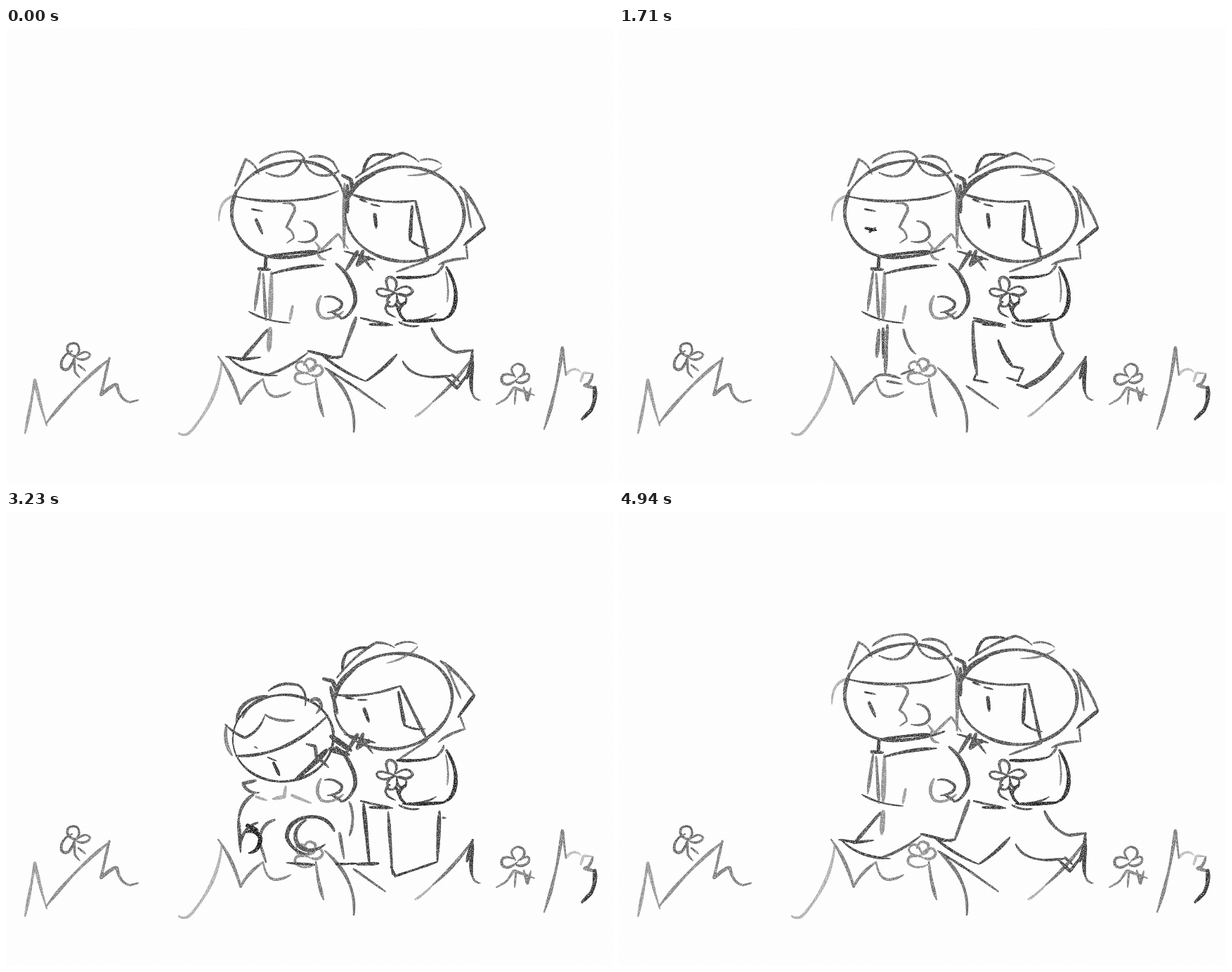
Write an HTML page with a canvas that moves like this. It is 864 px wide and 648 px high and loops after 5.13 s.

```html
<!DOCTYPE html>
<html>
<head>
<meta charset="utf-8">
<title>Pencil walk</title>
<style>
html, body { margin: 0; width: 100%; height: 100%; overflow: hidden; background: #fdfdfd }
canvas { display: block }
</style>
</head>
<body>
<canvas id="stage" width="864" height="648"></canvas>
<script>
const ctx = document.getElementById('stage').getContext('2d');
const STEP = 190, PAPER = '#fdfdfd';

// Each line: stroke width, grey level, path.
const art = {
  grassLeft: `
5 145 M27 577Q36 535 41 501Q48 535 58 566
5 130 M58 562Q100 508 148 471
5 120 M147 470L135 523Q152 507 158 508Q161 529 176 533L188 530
4 95 M98 468Q83 462 89 451Q105 444 104 461L98 470M94 460Q76 468 79 484Q91 494 98 466
4 105 M100 468Q114 456 120 466Q113 476 100 470M97 470L98 490L105 498M103 480L113 488`,
  grassMid: `
5 120 M302 468Q322 494 334 535Q344 515 366 500
5 170 M307 474Q304 525 266 571Q256 584 246 577
4 125 M366 500Q370 525 384 525Q396 524 405 518
5 110 M441 500Q444 530 452 553
5 105 M454 484Q500 525 495 575
4 95 M495 510L540 542
4 170 M583 553Q596 545 608 532
5 105 M608 532Q640 505 665 468
6 55 M664 469L656 499M664 475Q660 510 664 521
4 95 M664 520Q666 529 675 530`,
  wildflower: `
4 130 M430 492Q410 490 413 479Q424 468 431 488M424 480Q428 466 440 474Q443 488 428 490
4 135 M432 486Q448 474 451 488Q446 500 431 493M428 492Q408 488 412 502Q424 512 441 503`,
  grassRight: `
4 105 M725 497Q713 483 728 478Q746 482 732 497M722 495Q702 489 706 504Q713 513 728 500
4 105 M729 498Q748 486 744 500Q735 509 724 503
4 120 M698 536L712 528L723 512L752 523M726 512L724 536M737 512L742 531L747 513
5 120 M766 571Q784 520 792 455L797 494
4 180 M797 494Q808 480 818 490M818 503L822 491L835 492
5 115 M835 493Q832 507 824 509L838 513
7 45 M838 512Q840 532 832 545L820 557`,
  girlHead: `
5 75 M483 261A84 67 3 0 1 652 269A84 67 3 0 1 483 261
5 60 M508 205Q514 183 524 181Q540 178 551 182
4 80 M498 213Q530 188 564 178Q578 181 588 191
3 90 M590 188Q608 184 620 194
3 130 M620 198Q604 210 572 210
7 70 M486 262L486 224M479 210L491 216L493 231M488 242Q497 217 525 208
4 70 M490 236Q532 252 582 246
5 70 M583 247L601 330
6 55 M578 254L575 302
4 50 M575 302Q588 313 602 314
6 45 M525 266L527 285
3 60 M504 244L514 248M520 251L532 254
5 90 M647 226Q668 248 682 285
6 55 M681 285L652 309
4 100 M653 230L662 284M655 309L657 328
4 95 M657 328Q630 329 616 337M601 331L556 347`,
  girlBlush: `4 185 M541 285L540 291M546 285L545 291M551 285L550 291`,
  neck: `
7 75 M500 319L484 345M508 318L500 338L516 326
4 70 M506 324L522 345M500 334L522 328M482 318L525 330`,
  girlBody: `
5 40 M557 355Q594 357 612 350
4 90 M612 350Q622 342 623 334
6 35 M627 341Q642 365 640 386Q638 409 624 414
5 25 M624 415Q595 418 565 417
3 115 M626 347Q631 372 628 390
3 60 M575 417Q603 414 612 407
4 65 M505 413Q525 418 550 423M560 419Q574 427 588 424
5 50 M518 422L546 423`,
  heldFlower: `
4 80 M545 374Q536 353 549 355Q561 361 552 376M552 376Q525 366 528 377Q535 387 555 377
4 75 M555 374Q572 362 579 375Q574 385 555 378M551 378Q539 385 544 396Q557 400 557 382
4 65 M560 378Q574 381 568 393Q557 397 556 380M546 390Q535 399 545 407L554 412
5 40 M568 391Q554 401 564 412M556 395L562 410L570 418`,
  arm: `
6 80 M470 336Q488 350 493 370
6 60 M481 348Q499 370 497 391Q490 411 477 414
5 140 M448 382Q438 400 449 412Q462 418 480 404
4 75 M454 383Q467 380 478 391Q479 403 458 405M464 404L479 414`,
  headWalk: `
5 75 M482 242Q472 191 413 189Q352 193 327 235
6 80 M328 232Q314 266 329 292
5 65 M328 291Q346 326 389 327Q432 326 463 314
4 100 M326 225L341 187Q354 192 360 208
4 95 M361 192Q382 174 410 176Q420 178 425 186
4 90 M370 206Q390 216 408 207Q420 196 423 184
4 90 M432 184Q451 179 466 191L474 206M424 187Q429 207 448 210Q465 211 474 203
4 70 M324 239Q366 250 415 245Q450 243 473 232
4 165 M327 239Q303 242 303 275
3 55 M350 258L365 261
4 110 M394 250Q412 247 411 260L399 284Q409 289 410 299L400 306
4 95 M424 275Q443 277 442 296Q435 308 416 304
4 130 M440 305L449 316L473 293L487 314M446 311Q440 328 455 330
6 120 M482 222L481 313
5 55 M371 326Q410 319 444 318M370 326L369 343`,
  eyeOpen: `5 65 M356 273L365 293`,
  eyeShut: `4 25 M351 285L366 288M357 290L365 285`,
  torso: `
5 60 M378 350Q415 339 452 338M360 343L376 344
5 115 M362 345L354 402M366 350L370 416
7 145 M378 348L376 416
3 55 M346 404Q370 418 404 420
5 155 M408 396L404 416`,
  swungArm: `
5 60 M359 350Q350 376 332 400Q326 425 342 435Q360 436 364 420
5 40 M344 402Q352 411 364 410M357 414L372 419
4 75 M359 355L357 400`,
  legsA: `
6 75 M372 430L335 473
7 140 M376 428L374 460
4 55 M313 468L338 472L362 469M318 470Q342 494 386 495
4 80 M371 494Q399 487 430 462
4 55 M430 460Q450 465 474 471M450 466Q480 491 512 503
6 90 M498 413L478 468
4 65 M478 468L455 470M456 485L498 512
5 60 M512 503Q536 488 556 465
4 65 M565 475Q576 498 614 497L635 495
5 80 M606 428Q617 454 640 462L664 459
5 65 M664 459L661 488L642 513L625 496M635 494L645 503`,
  legsB: `
6 70 M400 423L378 490M375 425Q370 450 382 471
5 45 M384 426L375 444L389 456
4 20 M345 497L368 494L384 490M358 486L383 502L412 506
5 65 M478 449L466 478M496 460Q499 474 488 492
6 25 M448 490L466 481L490 499M488 475L480 496
5 55 M505 415Q517 440 526 461L543 465M508 421L547 425
6 70 M544 429L527 488
5 15 M526 488L500 501L518 505L553 505
6 65 M632 441Q636 456 608 499M610 459L584 493M618 438L636 442
8 20 M594 490L576 504M611 484L608 500M588 501L602 488
4 150 M622 421L604 455`,
  legsC: `
6 100 M370 430L367 468M382 424L379 491
5 70 M376 428L376 470
5 100 M405 430Q410 455 422 464
4 90 M362 500Q371 488 400 499M402 493L420 486M382 503L403 507
6 80 M504 418Q503 455 510 494
4 60 M508 493L505 501L525 505M506 417L550 426
6 50 M540 445Q545 463 560 482
4 55 M560 482L576 485L568 503L552 498
5 90 M615 418Q618 447 633 463
8 70 M631 464Q612 498 577 511
4 40 M567 508L582 513`,
  girlStand: `
6 55 M509 418L517 500M500 503L530 502
5 70 M544 429L550 517
6 65 M617 428L614 499
4 45 M548 507L554 520Q578 512 613 500M622 437L626 437`,
  headTilt: `
5 65 M311 293A76 65 -2 0 1 464 287A76 65 -2 0 1 311 293
4 65 M312 290Q393 295 447 250
5 115 M299 282Q305 243 320 238Q326 252 340 257
4 100 M340 257Q360 260 370 244Q380 240 387 251L402 253
4 90 M347 232Q352 211 379 220L400 228M408 222Q432 215 443 240
5 155 M308 290Q291 301 304 318L313 321M302 332L312 327
5 140 M343 316Q345 330 355 335
3 70 M341 303L352 305
6 130 M382 294L390 304L387 332
4 90 M380 293Q401 291 397 310
5 55 M400 313Q419 313 419 325Q412 340 395 334
5 140 M428 282Q444 278 443 296Q449 319 465 310M457 300L470 325
6 125 M463 264L466 291`,
  bodyTilt: `
5 60 M371 367L390 412M370 368Q350 392 340 420
5 90 M340 419Q341 438 350 440L355 433
4 65 M389 412L440 413M398 424L436 422
8 65 M394 436L379 489
8 40 M435 440L444 485
4 25 M370 499L400 501L414 506`,
  headCrouch: `
4 55 M323 330A71 61 -5 0 1 466 317A71 61 -5 0 1 323 330
5 60 M328 349Q400 350 458 291
4 65 M312 304Q325 317 340 323Q361 314 369 290
4 100 M369 290Q384 301 410 298
5 120 M314 305Q309 330 322 348
5 80 M328 300Q331 267 372 263M337 294Q344 274 370 266
4 70 M374 256Q391 242 416 248Q429 256 426 277
5 95 M432 271Q446 261 449 279L442 288
6 45 M381 359L389 376
3 60 M373 351L385 356M354 336L358 338
5 75 M428 332L440 335L442 349L459 365
8 60 M463 321L491 341M462 339L488 347M456 341Q433 366 413 381`,
  bodyCrouch: `
5 85 M355 384L337 388Q344 403 360 401M352 404Q332 417 331 443
5 70 M331 440L334 486M358 444Q338 450 334 473
6 20 M343 457Q357 453 362 466Q361 485 346 487M344 448L358 455
5 90 M382 440Q359 447 362 475L370 500
6 60 M467 455Q455 430 423 437Q399 445 400 466Q409 487 431 489
6 75 M427 440Q404 455 416 476Q432 491 454 475
5 100 M475 459L481 495M489 415Q498 438 489 462
5 160 M398 393L396 407L380 410M407 405L434 416M356 407L371 412
4 45 M400 501L440 504M470 503L500 502`,
  headPicked: `
5 30 M322 290A79 70 0 0 1 482 290A79 70 0 0 1 322 290
4 85 M348 232Q350 202 370 200Q389 203 395 213
5 100 M344 239Q319 228 320 264M321 276Q304 286 313 307L326 310
5 100 M325 309Q315 337 332 345L350 346
4 85 M338 238Q351 260 375 268L391 249Q400 263 424 262
5 90 M440 262L460 232L477 264
4 85 M333 287Q400 306 469 262
6 45 M354 311L359 330M405 310L408 330
3 65 M352 298L367 296M397 301L410 298
4 185 M425 326L424 333M430 326L429 333M435 326L434 333
5 85 M453 306Q469 305 466 326L452 323M461 306L486 326
5 90 M338 349Q331 364 349 370L375 370
5 115 M345 354Q370 352 390 360M403 373Q446 370 463 350`,
  bodyPicked: `
5 95 M348 370Q342 391 346 414L370 417
6 40 M381 398Q398 400 392 418Q382 423 368 421
7 20 M440 392A20 18 0 0 1 480 390A20 18 0 0 1 440 392
4 100 M452 377Q465 384 462 400M440 413Q470 439 497 418
6 70 M368 432L366 489M376 428L374 482
4 95 M350 488Q372 482 377 492M358 492Q385 505 412 495L441 498L458 490
4 80 M504 374Q488 369 492 362Q506 360 506 375Q520 358 520 370Q514 380 498 376
5 65 M505 375Q488 391 503 396Q517 381 506 376M500 390L505 414`,
  girlPickedLegs: `
6 55 M509 418L517 500M500 503L530 502
6 65 M544 455L551 508M617 450L614 499
5 40 M548 507L554 520Q578 512 613 500`
};

const scenery = ['grassLeft', 'grassMid', 'grassRight', 'neck', 'girlBody', 'heldFlower', 'arm'];
const walker = ['wildflower', 'torso', 'headWalk'];
const poses = {
  A: [...walker, 'eyeOpen', 'legsA'],
  B: [...walker, 'eyeOpen', 'legsB', 'swungArm'],
  C: [...walker, 'eyeOpen', 'legsC'],
  c: [...walker, 'eyeShut', 'legsC'],
  T: ['wildflower', 'headTilt', 'bodyTilt', 'girlStand'],
  K: ['wildflower', 'headCrouch', 'bodyCrouch', 'girlStand'],
  P: ['headPicked', 'bodyPicked', 'girlPickedLegs', 'girlBlush']
};
// Pose, lean of the girl's head in degrees, drop of the boy's head.
const timeline = ('A,B,C,B,A,B,C,B,A,c,C,c,C,T -4 -6,T -7,T -9 8,K -12 -8,K -14,K -14 2,' +
  'K -14,K -12 -6,P -9 6,P -7,P -4 -3,c,B,A').split(',').map(s => s.split(' '));

let seed = 7;
const random = () => (seed = seed * 16807 % 2147483647) / 2147483647;

// Turn each path into a run of dots with a soft change of pressure.
function trace(line) {
  const [, width, grey, d] = line.match(/^(\S+) (\S+) (.+)$/);
  return d.split('M').slice(1).map(sub => {
    const path = document.createElementNS('http://www.w3.org/2000/svg', 'path');
    path.setAttribute('d', 'M' + sub);
    const length = path.getTotalLength(), n = Math.ceil(length / 3), dots = [];
    const phase = random() * 6;
    for (let i = 0; i <= n; i++) {
      const t = i / n, p = path.getPointAtLength(t * length);
      const taper = Math.min(1, .55 + 3 * t * (1 - t));
      dots.push([p.x, p.y, width * taper * (.86 + .14 * Math.sin(phase + i / 4))]);
    }
    return { grey, dots };
  });
}
const parts = {};
for (const name in art) parts[name] = art[name].trim().split('\n').flatMap(trace);

function makeGrain() {
  const tile = document.createElement('canvas');
  tile.width = tile.height = 256;
  const c = tile.getContext('2d'), image = c.createImageData(256, 256);
  for (let i = 0; i < image.data.length; i += 4) {
    image.data.fill(random() ** 3 * 170, i, i + 3);
    image.data[i + 3] = 255;
  }
  c.putImageData(image, 0, 0);
  return ctx.createPattern(tile, 'repeat');
}
const grain = makeGrain();

function drawPart(name) {
  for (const { grey, dots } of parts[name]) {
    ctx.strokeStyle = `rgb(${grey},${grey},${grey})`;
    for (let i = 1; i < dots.length; i++) {
      ctx.lineWidth = dots[i][2];
      ctx.beginPath();
      ctx.moveTo(dots[i - 1][0], dots[i - 1][1]);
      ctx.lineTo(dots[i][0], dots[i][1]);
      ctx.stroke();
    }
  }
}

function draw([pose, lean = 0, drop = 0]) {
  ctx.globalCompositeOperation = 'source-over';
  ctx.fillStyle = PAPER;
  ctx.fillRect(0, 0, 864, 648);
  ctx.globalCompositeOperation = 'darken';
  ctx.lineCap = 'round';
  for (const name of [...scenery, 'girlHead', ...poses[pose]]) {
    ctx.save();
    if (/^girl(Head|Blush)/.test(name)) {
      ctx.translate(584, 335);
      ctx.rotate(lean * Math.PI / 180);
      ctx.translate(-584, -335);
    } else if (/^head/.test(name)) ctx.translate(0, +drop);
    drawPart(name);
    ctx.restore();
  }
  ctx.globalCompositeOperation = 'screen';
  ctx.fillStyle = grain;
  ctx.fillRect(0, 0, 864, 648);
}

const start = performance.now();
let shown = -1;
function tick() {
  const step = Math.floor((performance.now() - start) / STEP) % timeline.length;
  if (step !== shown) draw(timeline[shown = step]);
  requestAnimationFrame(tick);
}
tick();
</script>
</body>
</html>
```
